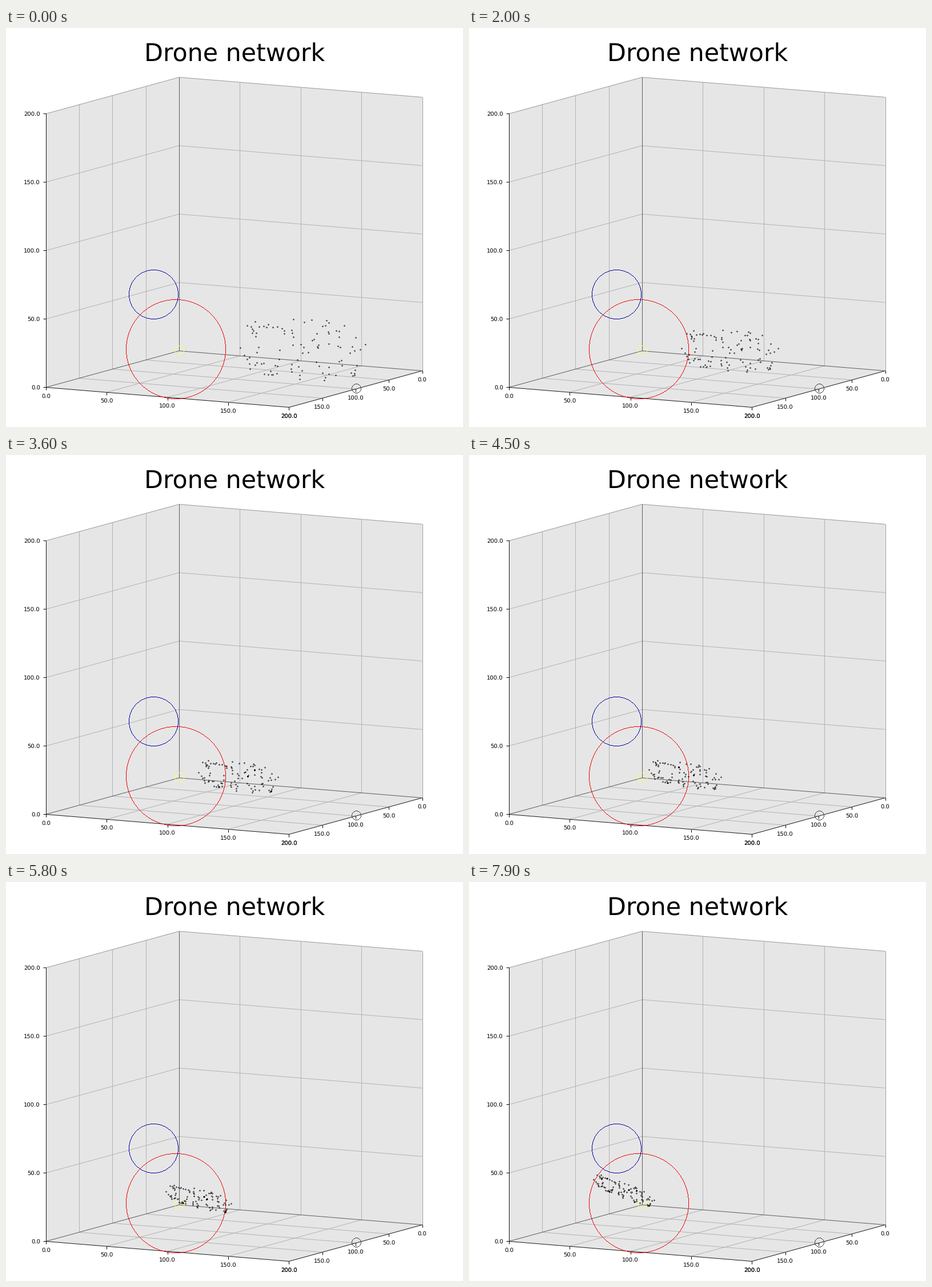
Write a matplotlib script that moves like this. It is 800x700 px and loops after 8 s.

```python
import numpy as np
import matplotlib.pyplot as plt
from matplotlib.animation import FuncAnimation
from matplotlib.patches import Polygon

W, H, DPI = 800, 700, 100
PX = 72 / DPI
FRAMES, STEP = 80, 100
DRONES = 100
M = 200

plt.rcParams["font.family"] = "DejaVu Sans"
plt.rcParams["text.hinting"] = "none"
fig = plt.figure(figsize=(W / DPI, H / DPI), dpi=DPI, facecolor="white")
ax = fig.add_axes([0, 0, 1, 1])
ax.set_xlim(0, W)
ax.set_ylim(H, 0)
ax.axis("off")


def project(x, y, z):
    """Box coordinates (0..200) to pixels."""
    return (303 + 2.128 * x - 1.166 * y,
            566.45 + 0.175 * x + 0.32 * y - 2.4 * z)


def segment(a, b, color, order=2):
    (x0, y0), (x1, y1) = a, b
    ax.plot([x0, x1], [y0, y1], color=color, lw=PX, zorder=order,
            solid_capstyle="butt")


def label(x, mid, text, size=10, ha="center"):
    ax.text(x, mid + 0.365 * size, text, fontsize=size * PX, ha=ha,
            va="baseline", color="black", zorder=5)


def ring(cx, cy, r, color):
    """One-pixel circle, mirrored from a single octant."""
    i = np.arange(int(r / np.sqrt(2)) + 1)
    j = np.round(np.sqrt(r * r - i * i))
    for sx in (1, -1):
        for sy in (1, -1):
            ax.plot(cx + sx * i, cy + sy * j, ",", color=color, zorder=4)
            ax.plot(cx + sx * j, cy + sy * i, ",", color=color, zorder=4)


def axis_point(axis, v):
    p = [0, 0, 0]
    p[axis] = v
    return np.array(p)


# Panels, back edges and grid: each panel spans two axes
for a, b in ((1, 2), (0, 2), (0, 1)):
    ea, eb = axis_point(a, M), axis_point(b, M)
    corners = [project(*c) for c in (0 * ea, ea, ea + eb, eb)]
    ax.add_patch(Polygon(corners, fc="#e6e6e6", ec="none", zorder=1))
    for v in (50, 100, 150):
        for p, e in ((axis_point(a, v), eb), (axis_point(b, v), ea)):
            segment(project(*p), project(*(p + e)), "#b3b3b3")
for axis in range(3):
    segment(project(0, 0, 0), project(*axis_point(axis, M)), "#5c5c5c", 3)

# Outer edges: light at the top and right, dark along the axes
for path, color in (
    ([(0, M, M), (0, 0, M), (M, 0, M), (M, 0, 0)], "#999999"),
    ([(0, M, M), (0, M, 0), (M, M, 0), (M, 0, 0)], "#1a1a1a"),
):
    for p, q in zip(path, path[1:]):
        segment(project(*p), project(*q), color, 3)

# Ticks and labels
for v in range(0, M + 1, 50):
    text = f"{v:.1f}"
    x, y = project(0, M, v)
    segment((x - 5, y), (x, y), "black", 3)
    label(60, y, text, ha="right")
    for corner in ((v, M, 0), (M, v, 0)):
        x, y = project(*corner)
        segment((x, y), (x, y + 5), "black", 3)
        label(x, y + 14.5, text)
label(400, 42.4, "Drone network", 42.7)

ring(303, 566, 8, "#ffff4d")
ring(297, 564, 87, "#f00000")
ring(258, 468, 43, "#0000aa")
ring(613, 633, 8, "#404040")

# Swarm: even scatter in a rounded box, fixed for each drone
rng = np.random.default_rng(12)
scatter = rng.uniform(-1, 1, (4 * DRONES, 2))
inside = (np.abs(scatter) ** 3).sum(axis=1) < 1
u, v = scatter[inside][:DRONES].T

# Each drone is a tiny ring of four pixels
CROSS = np.array([(1, 0), (-1, 0), (0, 1), (0, -1)])
dots, = ax.plot([], [], ",", color="black", zorder=6)


def swarm(s):
    """Drift left, draw together and tilt as s goes from 0 to 1."""
    shrink = (1 - s) ** 2
    dx = (54 + 58 * shrink) * u
    dy = (14 + 41 * shrink) * v + (0.05 + 0.33 * s * s) * dx
    return np.column_stack([521 - 249 * s + dx,
                            563 + 22 * s - 43 * s * s + dy])


def update(n):
    p = np.round(swarm(n / (FRAMES - 1)))
    q = (p[:, None] + CROSS).reshape(-1, 2)
    dots.set_data(q[:, 0], q[:, 1])
    return dots,


anim = FuncAnimation(fig, update, frames=FRAMES, interval=STEP, repeat=True,
                     repeat_delay=0, blit=False)
plt.show()
```
